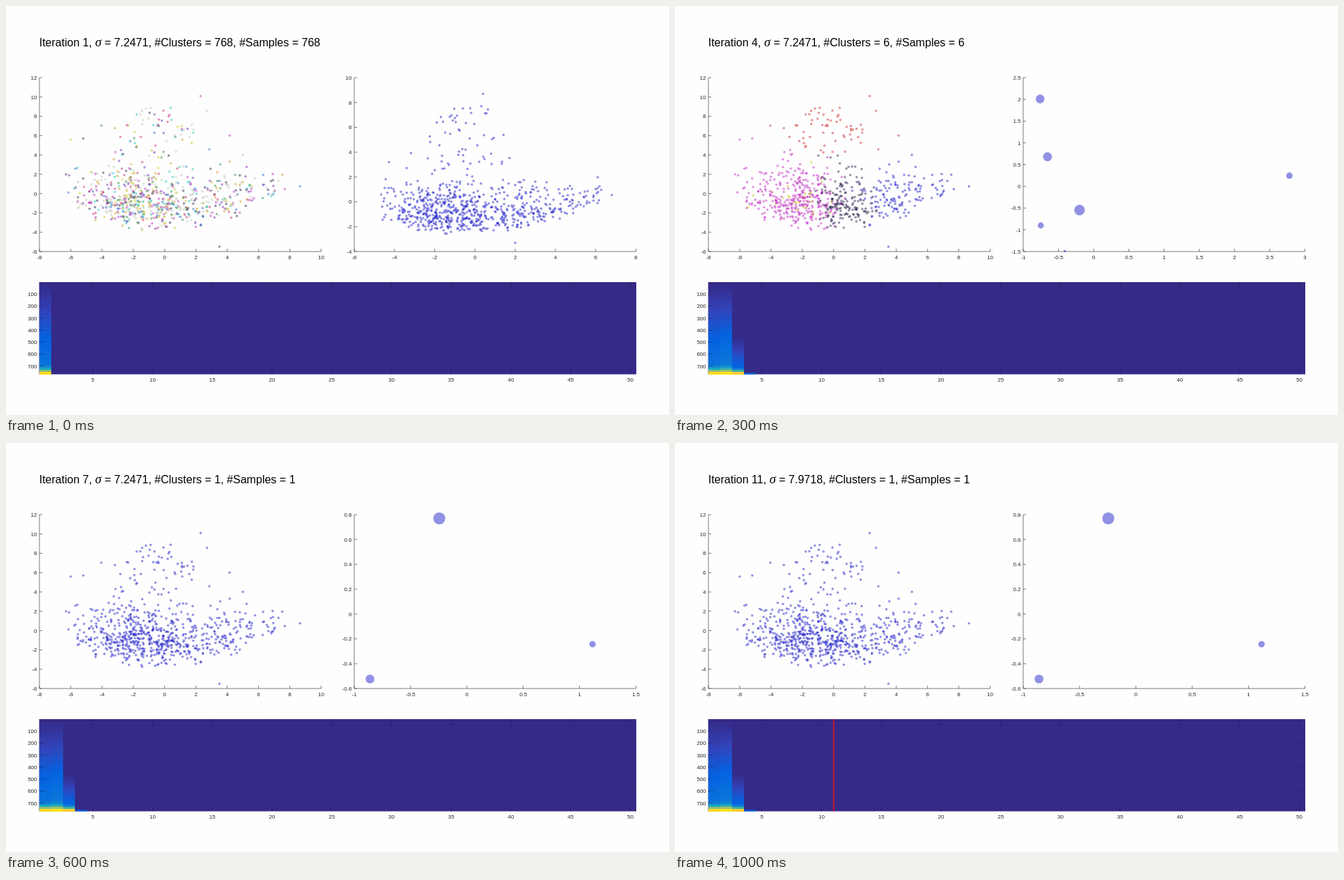
An HTML page for the animation above (1.1 s loop, 952 by 588 pixels).

```html
<!DOCTYPE html>
<html lang="en">
<head>
<meta charset="utf-8">
<title>Cluster iterations</title>
<style>
  html, body { margin: 0; width: 100%; height: 100%; overflow: hidden; background: #fefefe; }
  svg { display: block; width: 952px; height: 588px; font: 8px "Liberation Sans", Arial, sans-serif; fill: #262626; }
  .title { font-size: 16.04px; fill: #000; }
  .sigma { font: italic 18.5px "Liberation Serif", "Times New Roman", serif; }
  .axis { stroke: #5a5a5a; stroke-width: .8; fill: none; }
  .tick { stroke: #1c1c40; stroke-opacity: .6; stroke-width: .7; fill: none; }
  .dots { fill: #2323cc; fill-opacity: .5; }
</style>
</head>
<body>
<svg id="stage" viewBox="0 0 952 588">
  <text class="title" x="47.7" y="57.5">Iteration <tspan id="iter">1</tspan>, <tspan class="sigma">σ</tspan> = <tspan id="sigma">7.2471</tspan>, #Clusters = <tspan id="clusters">768</tspan>, #Samples = <tspan id="samples">768</tspan></text>
</svg>
<script>
const stage = document.getElementById('stage');

function add(parent, tag, attrs, text) {
  const el = document.createElementNS('http://www.w3.org/2000/svg', tag);
  for (const k in attrs) el.setAttribute(k, attrs[k]);
  if (text !== undefined) el.textContent = text;
  return parent.appendChild(el);
}

function seeded(seed) {
  return () => {
    seed = seed + 0x6D2B79F5 | 0;
    let t = Math.imul(seed ^ seed >>> 15, 1 | seed);
    t = t + Math.imul(t ^ t >>> 7, 61 | t) ^ t;
    return ((t ^ t >>> 14) >>> 0) / 4294967296;
  };
}
const normal = rnd => Math.sqrt(-2 * Math.log(1 - rnd())) * Math.cos(2 * Math.PI * rnd());
const clamp = v => Math.max(0, Math.min(1, v));
const repeat = (n, make) => Array.from({ length: n }, (_, i) => make(i));

// Plot area is 404.5 x 250; limits are [from, to, step]
function plot(left, xLim, yLim) {
  const g = add(stage, 'g', {});
  const px = v => left + (v - xLim[0]) / (xLim[1] - xLim[0]) * 404.5;
  const py = v => 353 - (v - yLim[0]) / (yLim[1] - yLim[0]) * 250;
  const label = v => String(+v.toFixed(1) || 0);
  let d = `M${left} 103V353H${left + 404.5}`;
  for (let v = xLim[0]; v < xLim[1] + .01; v += xLim[2]) {
    d += `M${px(v)} 353v-4`;
    add(g, 'text', { x: px(v), y: 363.5, 'text-anchor': 'middle' }, label(v));
  }
  for (let v = yLim[0]; v < yLim[1] + .01; v += yLim[2]) {
    d += `M${left} ${py(v)}h4`;
    add(g, 'text', { x: left - 3.5, y: py(v) + 2.9, 'text-anchor': 'end' }, label(v));
  }
  add(g, 'path', { class: 'axis', d });
  const dots = add(g, 'g', { class: 'dots' });
  const dot = (x, y, r = 1.75) => add(dots, 'circle', { cx: px(x).toFixed(2), cy: py(y).toFixed(2), r });
  return { g, dot };
}

// Wide shallow bowl: two lobes along x, skewed normal spread around a curved middle
function bowl(rnd, count, o) {
  const out = [];
  while (out.length < count) {
    const x = rnd() < .62 ? o.left[0] + o.left[1] * normal(rnd) : o.right[0] + o.right[1] * normal(rnd);
    if (x < o.min || x > o.max) continue;
    const bend = (x + .4) ** 2, n = normal(rnd);
    const y = o.mid + o.curve * bend + o.spread * n * (n > 0 ? 1.15 : .85) * (1 - bend / o.taper);
    if (y > o.floor + o.rise * bend) out.push([x, y]);
  }
  return out;
}

// Sparse plume above the bowl, narrowing towards the top
function plume(rnd, count, o) {
  return repeat(count, () => {
    const h = rnd();
    return [o.x + o.lean * h + o.width * (1.2 - .7 * h) * normal(rnd), o.low + (o.high - o.low) * h];
  });
}

// Left: the samples
const cloudRnd = seeded(11);
const samples = [
  [2.3, 10.1], [8.65, .75], [3.5, -5.5], [-6, 5.6], [-5.2, 5.7], [-6.3, 2], [4.15, 6], [5, 4],
  ...plume(cloudRnd, 66, { x: -.7, lean: .6, width: 1.9, low: 3.6, high: 9 }),
  ...bowl(cloudRnd, 694, {
    left: [-1.9, 1.9], right: [2.8, 2.5], min: -6.2, max: 7.7,
    mid: -1, curve: .028, spread: 1.6, taper: 110, floor: -4, rise: .065
  })
];

const tone = {
  blue: '#2323cc', magenta: '#c430c4', dark: '#2b2350', red: '#d22d2d', yellow: '#c8c81e', cyan: '#1ec8c8', green: '#2f8c3c',
  pale: '#c0c8b4', orange: '#cc9a1e', purple: '#7a28b4', sky: '#2868d2', navy: '#1e1e96', rose: '#d2287a'
};
const mixed = ['pale', 'magenta', 'yellow', 'cyan', 'purple', 'green', 'pale', 'rose', 'pale', 'orange', 'sky', 'dark', 'pale'];

// Thirty clusters, seen as overlapping patches
function patch(x, y) {
  if (y > 8.3) return 'pale';
  if (y > 4) return x < -2 ? 'magenta' : 'red';
  if (x > 5) return 'cyan';
  if (x > 2) return y < -1.7 ? 'green' : x > 3.6 && y > 1.4 ? 'yellow' : 'orange';
  if (x < -1.8 && y > .4) return 'yellow';
  if (x < -3.8) return 'dark';
  if (x < -.2) return y < -1.2 ? 'navy' : 'sky';
  return y < -3 ? 'red' : y > 1.5 ? 'sky' : x > 1.1 ? 'rose' : 'magenta';
}

function colours([x, y], rnd) {
  const pick = () => mixed[Math.floor(rnd() * mixed.length)];
  const nx = x + .55 * normal(rnd), ny = y + .5 * normal(rnd);
  const top = y > 4.2 && x + y > 2.3;
  const six = top ? 'red' : nx > 2.2 ? 'blue' : nx > -.3 ? 'dark' : rnd() < .06 ? 'yellow' : 'magenta';
  const three = top ? 'red' : nx > 1.2 ? 'blue' : 'magenta';
  return [pick(), pick(), patch(nx, ny), six, three, 'blue'].map(n => tone[n]);
}

const leftPlot = plot(48, [-8, 10, 2], [-6, 12, 2]);
const tint = seeded(5);
const sampleDots = samples.map(p => ({ el: leftPlot.dot(...p), fills: colours(p, tint) }));

// Right: the cluster centres, one plot per stage of merging
const views = [
  plot(500, [-6, 8, 2], [-4, 10, 2]),
  plot(500, [-6, 6, 2], [-4, 8, 2]),
  plot(500, [-5, 5, 1], [-3, 5, 1]),
  plot(500, [-1, 3, .5], [-1.5, 2.5, .5]),
  plot(500, [-1, 1.5, .5], [-.6, .8, .2])
];
const fill = (view, list) => list.forEach(p => views[view].dot(...p));

const centreRnd = seeded(23);
fill(0, [
  [.4, 8.7], [2, -3.3], [6.8, .55],
  ...plume(centreRnd, 56, { x: -1, lean: .4, width: 1.3, low: 2.6, high: 8 }),
  ...bowl(centreRnd, 709, {
    left: [-1.7, 1.7], right: [2.4, 2.4], min: -4.7, max: 6.4,
    mid: -1, curve: .032, spread: 1.15, taper: 72, floor: -2.65, rise: .06
  })
]);

// 277 centres: an L along the bottom left, then a band rising to a knot
const mergeRnd = seeded(37);
const size = () => (1.6 + 1.4 * mergeRnd() ** 2).toFixed(2);
fill(1, [
  ...plume(mergeRnd, 36, { x: -2.3, lean: -.3, width: .9, low: 1, high: 7.2 }),
  ...repeat(135, () => {
    const x = -3.8 + 4.6 * mergeRnd();
    return [x, -2.4 + .12 * normal(mergeRnd) + 2.7 * mergeRnd() ** 2.2];
  }),
  ...repeat(92, () => {
    const x = .4 + 4.2 * mergeRnd() ** 1.2;
    return [x, -1.7 + .62 * (x - .4) + .5 * normal(mergeRnd)];
  }),
  ...repeat(14, () => [5.05 + .15 * normal(mergeRnd), 1 + .2 * normal(mergeRnd)])
].map(p => [...p, size()]));

// 30 centres along a V with its foot at x = 1
const veeRnd = seeded(8);
const vee = x => -2.5 + (x < 1 ? 5.2 * ((1 - x) / 5.15) ** 1.1 : 6.7 * ((x - 1) / 3.55) ** .8);
fill(2, [
  [-4.15, 2.7, 4.9], [-3.3, 2.4, 4.9], [-1.47, -.35, 5], [-.2, -1.9, 5.7],
  [.42, -.94, 4.7], [1.21, -2.52, 4.5], [1.57, -1.73, 4.9], [3.21, 2.89, 3.9],
  ...repeat(22, i => {
    const x = -3.5 + 8 * (i / 21) + .15 * normal(veeRnd);
    return [x, Math.max(-2.8, vee(x) + .35 * normal(veeRnd)), 2 + 2.2 * veeRnd()];
  })
]);
fill(3, [[-.76, 2.01, 6.3], [-.655, .68, 6.4], [-.2, -.545, 7.6], [-.75, -.9, 4.4], [-.41, -1.49, 1.8], [2.78, .245, 4.6]]);
fill(4, [[-.245, .77, 8.6], [-.86, -.523, 6.3], [1.115, -.243, 4.6]]);

// Bottom: the heat map, 50 columns of 768 rows
const map = { x: 47.6, y: 397, w: 857.4, h: 132.5 };
const colW = map.w / 50, bands = 44;
const ramp = [[0, 53, 42, 135], [.063, 50, 67, 186], [.127, 3, 99, 225], [.25, 20, 133, 212],
  [.37, 6, 167, 198], [.63, 146, 191, 115], [.89, 252, 206, 46], [1, 249, 251, 14]];

function heatColour(v) {
  const i = Math.max(1, ramp.findIndex(k => k[0] >= v));
  const a = ramp[i - 1], b = ramp[i], t = (v - a[0]) / (b[0] - a[0]);
  return `rgb(${[1, 2, 3].map(k => Math.round(a[k] + (b[k] - a[k]) * t))})`;
}

const heat = add(stage, 'g', {});
const block = (parent, x, y, width, height, colour) => add(parent, 'rect', { x, y, width, height, fill: colour });
block(heat, map.x, map.y, map.w, map.h, heatColour(0));

// Values climb slowly from row "from", then steeply after "rise"
function column(index, from, slope, rise) {
  const g = add(heat, 'g', { 'shape-rendering': 'crispEdges' });
  const h = map.h / bands;
  for (let i = 0; i < bands; i++) {
    const t = i / (bands - 1);
    const v = slope * clamp((t - from) / (1 - from)) + .72 * clamp((t - rise) / (1 - rise)) ** 2;
    block(g, map.x + index * colW, map.y + i * h, colW, h, heatColour(v));
  }
  return g;
}
const columns = [
  column(0, 0, .2, .9),
  column(1, 0, .22, .89),
  column(2, .6, .16, .93),
  block(heat, map.x + 3 * colW, 527.5, colW, 2, heatColour(.13))
];
const marker = block(heat, 226.9, map.y, 2.1, map.h, '#c0143c');

let ticks = '';
for (let v = 5; v <= 50; v += 5) {
  const x = map.x + (v - .5) * colW;
  ticks += `M${x} ${map.y}v8M${x} ${map.y + map.h}v-8`;
  add(heat, 'text', { x, y: 539.8, 'text-anchor': 'middle' }, v);
}
for (let v = 100; v <= 700; v += 100) {
  const y = map.y + (v - .5) / 768 * map.h;
  ticks += `M${map.x} ${y}h8M${map.x + map.w} ${y}h-8`;
  add(heat, 'text', { x: 44.5, y: y + 2.9, 'text-anchor': 'end' }, v);
}
add(heat, 'path', { class: 'tick', d: ticks });

const counts = [768, 277, 30, 6, 3, 1];
const setText = (id, s) => { document.getElementById(id).textContent = s; };
const show = (el, on) => el.setAttribute('display', on ? 'inline' : 'none');

function render(step) {
  const phase = Math.min(step, 5);
  setText('iter', step + 1);
  setText('sigma', step === 10 ? '7.9718' : '7.2471');
  setText('clusters', counts[phase]);
  setText('samples', counts[phase]);
  for (const s of sampleDots) s.el.setAttribute('fill', s.fills[phase]);
  views.forEach((v, i) => show(v.g, i === Math.min(step, 4)));
  columns.forEach((c, i) => show(c, i <= step));
  show(marker, step === 10);
}

const start = performance.now();
let shown = -1;
function frame() {
  const step = Math.floor((performance.now() - start) % 1100 / 100);
  if (step !== shown) render(shown = step);
  requestAnimationFrame(frame);
}
frame();
</script>
</body>
</html>
```
